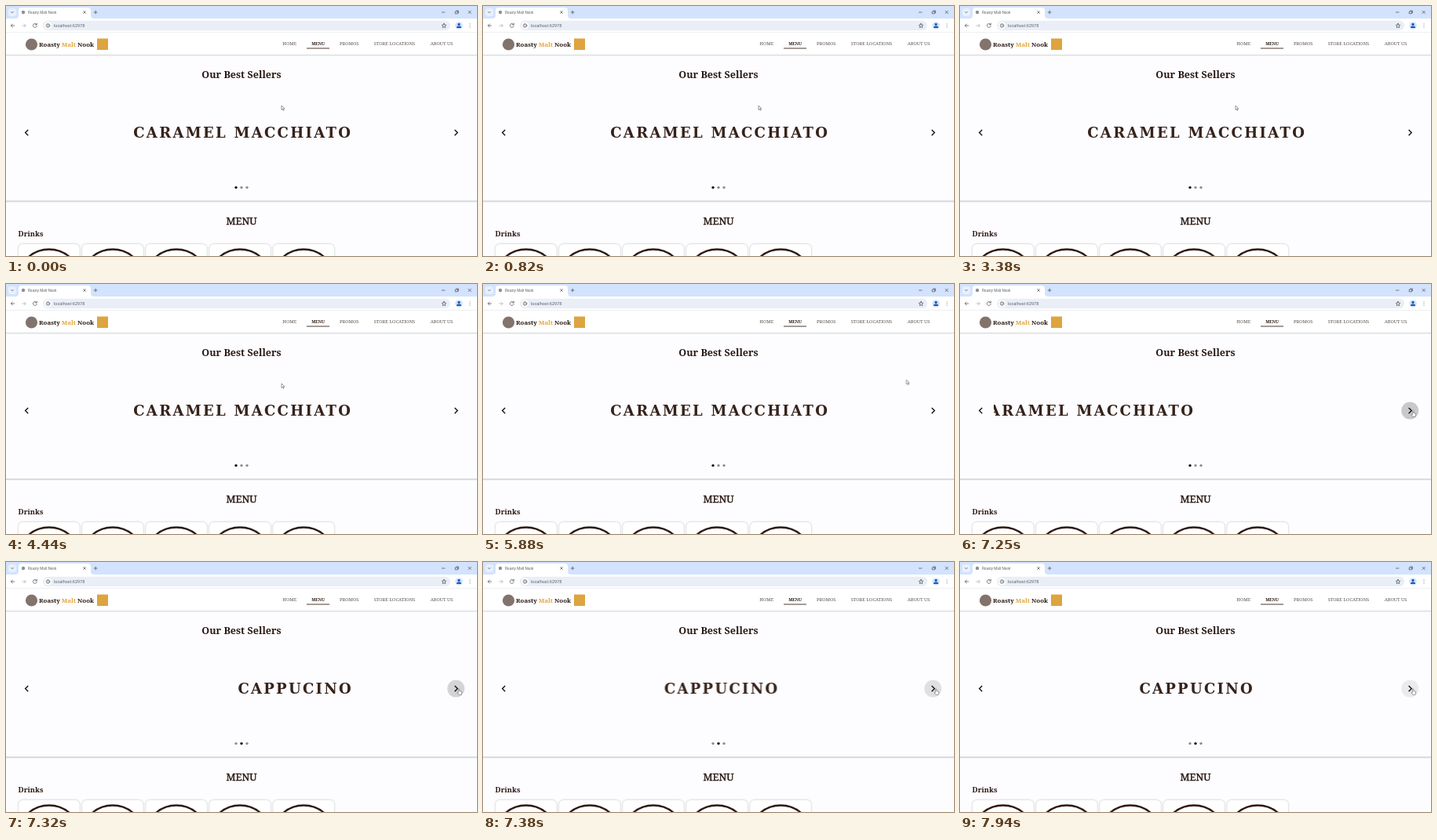
Animation, 600 px wide and 319 px high, one loop 8000 ms. Source, as an HTML page:

```html
<!DOCTYPE html>
<html lang="en">
<head>
<meta charset="utf-8">
<title>Roasty Malt Nook</title>
<style>
  html, body { margin: 0; width: 100%; height: 100%; overflow: hidden; background: #fdfcfe; }
  svg { display: block; width: 100vw; height: 100vh; }
  text { font-family: "Noto Serif", serif; fill: #2b1a14; }
  .ui { font-family: Roboto, sans-serif; fill: #5f6368; }
  .bold { font-weight: 700; }
  .nav { font-size: 5.8px; fill: #57504d; }
  .slide { font: 700 18px "DejaVu Serif", serif; letter-spacing: 2.3px; fill: #35231b; }
  .line { fill: none; stroke: #45484c; stroke-width: .7; stroke-linecap: round; stroke-linejoin: round; }
  .chevron { fill: none; stroke: #111; stroke-width: 1.35; }
  .pointer { fill: #fff; stroke: #55555a; stroke-width: .6; stroke-linejoin: round; }
  .mid { text-anchor: middle; }
</style>
</head>
<body>
<svg viewBox="0 0 600 319">
  <defs>
    <clipPath id="view"><rect x="43" y="140" width="514" height="45"/></clipPath>
    <filter id="soft" x="-10%" y="-10%" width="120%" height="120%"><feGaussianBlur stdDeviation="1"/></filter>
  </defs>
  <rect width="600" height="319" fill="#fdfcfe"/>

  <!-- Browser window -->
  <rect width="600" height="17" fill="#d3e3fd"/>
  <path d="M12 16q4 0 4-4V6q0-4 4-4h84q4 0 4 4v6q0 4 4 4H600V34H0V16z" fill="#fff"/>
  <rect x="3" y="3" width="10" height="10" rx="3" fill="#e8f0fe"/>
  <circle cx="22" cy="8" r="2.2" fill="#8d8f96"/>
  <text class="ui" x="28" y="9.7" font-size="4.6">Roasty Malt Nook</text>
  <g class="line">
    <path d="M6.6 7.4l1.4 1.4 1.4-1.4M98.6 6.6l2.8 2.8m0-2.8l-2.8 2.8M112.2 8h3.8m-1.9-1.9v3.8"/>
    <path d="M555.4 8h3.6M589 6.2l3.4 3.4m0-3.4l-3.4 3.4M572.6 7h2.8v2.8h-2.8zM573.6 6h2.8v2.8"/>
    <path d="M10.8 25H6.4m2-2L6.4 25l2 2"/>
    <path d="M20.8 25h4.4m-2-2l2 2-2 2" stroke="#a9abb0"/>
    <path d="M39 23.6a2.5 2.5 0 1 0 .3 2M39.3 22v1.9h-1.9"/>
  </g>
  <rect x="47" y="18.8" width="519" height="12.4" rx="6.2" fill="#e9eef7"/>
  <circle cx="53.5" cy="25" r="4.6" fill="#fff"/>
  <circle class="line" cx="53.5" cy="25" r="2.3"/>
  <path class="line" d="M53.5 24.9v1M53.5 23.7v.1"/>
  <text class="ui" x="61" y="26.9" font-size="5.5">localhost:62978</text>
  <path class="line" d="M558 22.3l.8 1.8 2 .2-1.5 1.4.4 2-1.7-1-1.7 1 .4-2-1.5-1.4 2-.2z"/>
  <circle cx="577" cy="25" r="4.8" fill="#d3e3fd"/>
  <path d="M574 28q0-2.4 3-2.4t3 2.4z" fill="#1a57b5"/>
  <circle cx="577" cy="23.4" r="1.6" fill="#1a57b5"/>
  <path class="line" d="M591 22.8v.1M591 25v.1M591 27.2v.1"/>

  <!-- Page header -->
  <rect y="62" width="600" height="1.6" fill="#dbe2e5" filter="url(#soft)"/>
  <rect y="33" width="600" height="29" fill="#fff"/>
  <path d="M0 33.5H600" stroke="#e5e8ed" stroke-width=".7"/>
  <path d="M0 62.5H600" stroke="#d6dee1"/>
  <circle cx="32.5" cy="49" r="7.6" fill="#82736c"/>
  <text class="bold" x="42" y="52" font-size="7.9" fill="#3a3432">Roasty <tspan fill="#e2a63a">Malt</tspan> Nook</text>
  <rect x="116" y="41.5" width="14" height="14.5" fill="#dda43f"/>
  <g class="mid">
    <text class="nav" x="361.3" y="49.8">HOME</text>
    <text class="nav bold" x="397.6" y="49.8" style="font-size:5.4px;fill:#2b1a14">MENU</text>
    <text class="nav" x="437.2" y="49.8">PROMOS</text>
    <text class="nav" x="495" y="49.8">STORE LOCATIONS</text>
    <text class="nav" x="555" y="49.8">ABOUT US</text>
  </g>
  <path d="M383 54H412" stroke="#4a3a33"/>

  <!-- Carousel -->
  <text class="mid bold" x="300" y="91.6" font-size="12.55">Our Best Sellers</text>
  <g clip-path="url(#view)">
    <g id="track" class="mid">
      <text class="slide" x="301.7" y="168.4">CARAMEL MACCHIATO</text>
      <text class="slide" x="815.7" y="168.4">CAPPUCINO</text>
    </g>
  </g>
  <circle id="halo" cx="573.2" cy="161.6" r="11" opacity="0"/>
  <path class="chevron" d="M28.2 158l-3.6 3.6 3.6 3.6M571.6 158l3.6 3.6-3.6 3.6"/>
  <g id="dots"></g>

  <!-- Menu list -->
  <path d="M0 249.2H600" stroke="#d4d9dd" stroke-width="2"/>
  <text class="mid" x="300" y="279.2" font-size="12.9" stroke="#2b1a14" stroke-width=".4">MENU</text>
  <text x="15.5" y="294" font-size="9.3" font-weight="600">Drinks</text>
  <g id="cards"></g>

  <path id="arrow" class="pointer" d="M0 0v5.5l1.3-1.2.9 2 .9-.4-.9-1.9h1.8z"/>
  <path id="hand" class="pointer" opacity="0" d="M-.7 3.7V.6q0-.7.7-.7t.7.7v2.1l2.4.5q.7.2.6 1L3.3 6.2 2.8 7.6H-.1L-2.2 4.8q.5-.9 1.5 0z"/>
</svg>
<script>
  const LOOP = 8000;
  const byId = id => document.getElementById(id);

  function add(parent, tag, attrs) {
    const el = document.createElementNS("http://www.w3.org/2000/svg", tag);
    for (const name in attrs) el.setAttribute(name, attrs[name]);
    return parent.appendChild(el);
  }

  // Each step is [time in ms, styles]; styles hold until the next step.
  function play(el, steps) {
    const frames = steps.map(([time, style]) => ({ ...style, offset: time / LOOP, easing: "step-end" }));
    frames.push({ ...steps[steps.length - 1][1], offset: 1 });
    el.animate(frames, { duration: LOOP, iterations: Infinity }).startTime = 0;
  }

  const at = (x, y, opacity = 1) => ({ transform: `translate(${x}px, ${y}px)`, opacity });
  const shade = opacity => ({ opacity });
  const fill = color => ({ fill: color });

  for (let i = 0; i < 5; i++) {
    const x = 15.6 + i * 81.1;
    const card = { x, y: 303.4, width: 78.4, height: 40, rx: 6 };
    add(byId("cards"), "rect", { ...card, fill: "#d9dade", filter: "url(#soft)" });
    add(byId("cards"), "rect", { ...card, fill: "#fff", stroke: "#dfe0e4", "stroke-width": .8 });
    add(byId("cards"), "circle", { cx: x + 39.2, cy: 350.5, r: 40, fill: "#fff", stroke: "#2d1a13", "stroke-width": 2.3 });
  }

  const dots = [293, 300, 307].map(cx => add(byId("dots"), "circle", { cx, cy: 231.6, r: 1.7, fill: "#8f8c8e" }));
  play(dots[0], [[0, fill("#111")], [7320, fill("#8f8c8e")]]);
  play(dots[1], [[0, fill("#8f8c8e")], [7320, fill("#111")]]);

  play(byId("track"), [
    [0, at(0, 0)], [7250, at(-142, 0)], [7320, at(-447, 0)],
    [7380, at(-511.6, 0)], [7440, at(-514, 0)]
  ]);

  play(byId("arrow"), [
    [0, at(351, 127)], [5630, at(369.2, 129)], [5880, at(539.3, 122.3)],
    [6250, at(560, 142)], [6320, at(576, 161, 0)]
  ]);
  play(byId("hand"), [[0, at(573, 158, 0)], [6320, at(574.5, 159.5)], [6440, at(577, 161.8)]]);

  play(byId("halo"), [
    [0, shade(0)], [6320, shade(.04)], [6440, shade(.07)], [7130, shade(.1)],
    [7190, shade(.14)], [7250, shade(.2)], [7320, shade(.16)], [7380, shade(.11)], [7440, shade(.07)]
  ]);
</script>
</body>
</html>
```
